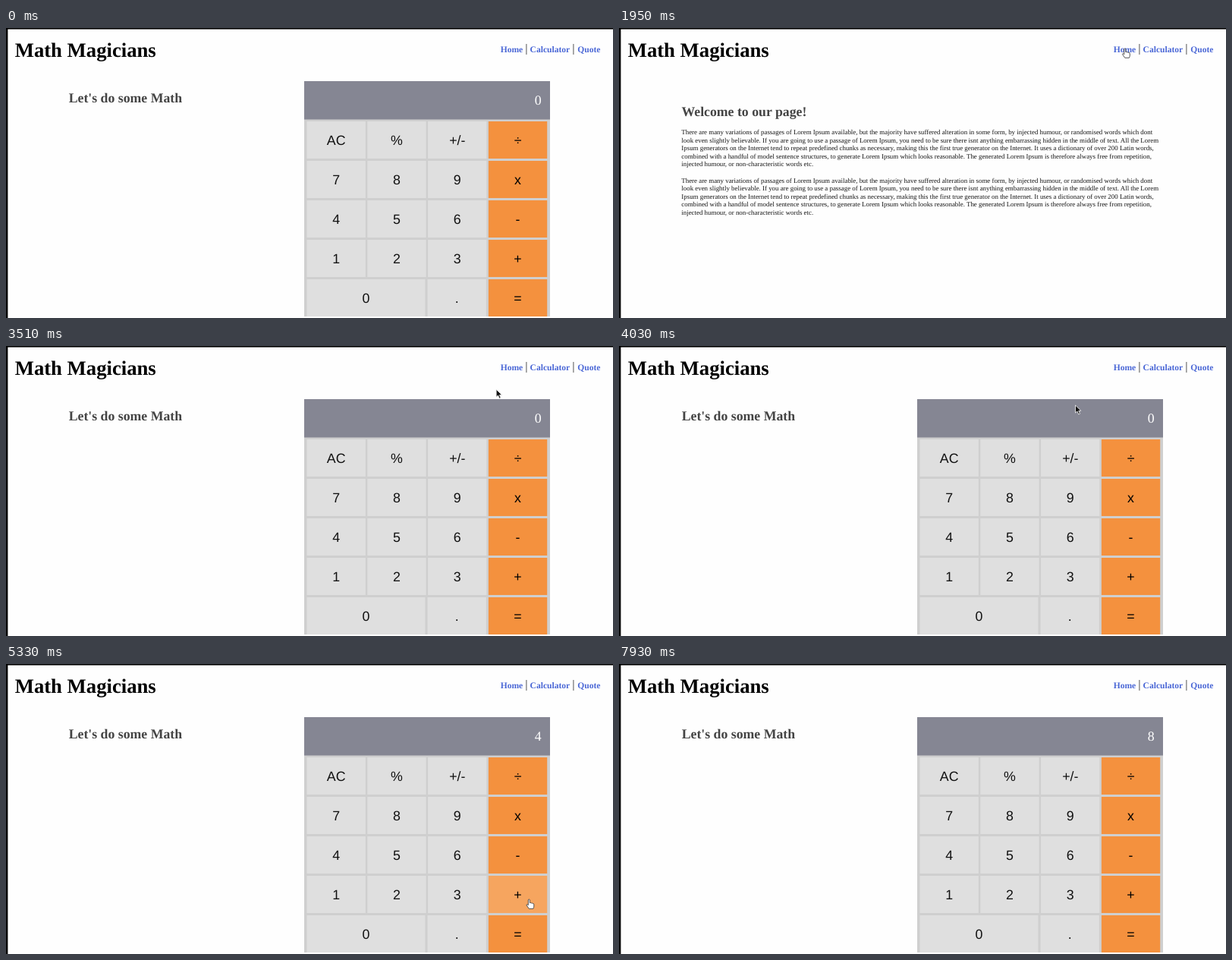
An HTML page for the animation above (9.1 s loop, 800 by 382 pixels).

```html
<!DOCTYPE html>
<html lang="en">
<head>
<meta charset="utf-8">
<title>Calculator demo</title>
<style>
  html, body { margin: 0; width: 100%; height: 100%; overflow: hidden; background: #fefefe; }
  svg { display: block; width: 800px; height: 382px; }
  text { font-family: "Liberation Serif", "Times New Roman", serif; white-space: pre; text-rendering: geometricPrecision; }
  .bold { font-weight: bold; }
  .nav { font-weight: bold; font-size: 11.55px; fill: #4a67d6; }
  .key { font-family: "Liberation Sans", Arial, sans-serif; font-size: 17.8px; text-anchor: middle; }
</style>
</head>
<body>
<svg id="stage" viewBox="0 0 800 382"></svg>
<script>
const LOOP = 9100, STEP = 130;
const stage = document.getElementById('stage');

function add(parent, tag, attrs, content) {
  const node = document.createElementNS('http://www.w3.org/2000/svg', tag);
  for (const name in attrs) node.setAttribute(name, attrs[name]);
  if (content !== undefined) node.textContent = content;
  parent.appendChild(node);
  return node;
}
const rect = (parent, x, y, width, height, fill) => add(parent, 'rect', { x, y, width, height, fill });
const text = (parent, x, y, content, attrs) => add(parent, 'text', { x, y, ...attrs }, content);
const show = (node, on) => node.setAttribute('visibility', on ? 'visible' : 'hidden');

// Header
rect(stage, 0, 0, 800, 382, '#fefefe');
rect(stage, 0, 0, 800, 1.6, '#000');
rect(stage, 0, 0, 2.4, 382, '#000');
text(stage, 11.7, 38, 'Math Magicians', { class: 'bold', 'font-size': 26.7, fill: '#000' });
[['Home', 651.7], ['Calculator', 690.6], ['Quote', 753.3]].forEach(([label, x]) => text(stage, x, 31.8, label, { class: 'nav' }));
[685.4, 747.4].forEach(x => rect(stage, x, 21, 1, 14, '#555'));

// Home page
const home = add(stage, 'g', {});
text(home, 82.5, 116, 'Welcome to our page!', { class: 'bold', 'font-size': 17.75, fill: '#444' });
const lorem = [
  'There are many variations of passages of Lorem Ipsum available, but the majority have suffered alteration in some form, by injected humour, or randomised words which dont',
  'look even slightly believable. If you are going to use a passage of Lorem Ipsum, you need to be sure there isnt anything embarrassing hidden in the middle of text. All the Lorem',
  'Ipsum generators on the Internet tend to repeat predefined chunks as necessary, making this the first true generator on the Internet. It uses a dictionary of over 200 Latin words,',
  'combined with a handful of model sentence structures, to generate Lorem Ipsum which looks reasonable. The generated Lorem Ipsum is therefore always free from repetition,',
  'injected humour, or non-characteristic words etc.'
];
[140, 203.6].forEach(top => lorem.forEach((line, i) =>
  text(home, 82.3, top + i * 10.55, line, { 'font-size': 8.9, fill: '#151515' })));

// Calculator page
const calculator = add(stage, 'g', {});
text(calculator, 82.7, 98, "Let's do some Math", { class: 'bold', 'font-size': 17.75, fill: '#444' });
rect(calculator, 393, 70, 324, 310, '#cfcfcf');
rect(calculator, 393, 70, 324, 50.5, '#858693');
const display = text(calculator, 705.6, 101.4, '0', { 'font-size': 17.8, fill: '#fff', 'text-anchor': 'end' });

const keys = [];
function addKey(label, x, y, width, orange) {
  const face = rect(calculator, x, y, width, 49, '');
  text(calculator, x + width / 2, y + 30.6, label, { class: 'key', fill: orange ? '#000' : '#111' });
  keys.push({ face, x, y, width, fill: orange ? '#f4913e' : '#dfdfdf', hover: orange ? '#f6a55f' : '#e7e7e7' });
}
const rows = [['AC', '%', '+/-', '÷'], ['7', '8', '9', 'x'], ['4', '5', '6', '-'], ['1', '2', '3', '+']];
rows.forEach((row, r) => row.forEach((label, c) => addKey(label, 396.5 + c * 79.8, 123 + r * 52, 77.3, c === 3)));
addKey('0', 396.5, 331, 156, false);
addKey('.', 555.5, 331, 77.3, false);
addKey('=', 635.9, 331, 77.3, true);

// Pointers, both with the hotspot at 0,0
const outline = { 'stroke-width': 0.9, 'stroke-linejoin': 'round' };
const arrow = add(stage, 'path', { d: 'M0 0V10L2.4 8L4.2 12L6 11.2L4.3 7.4H7.5Z', fill: '#111', stroke: '#eee', ...outline });
const hand = add(stage, 'path', {
  d: 'M-1.2 1Q-1.2 0 -.2 0T.8 1V4.6Q2 4 2.8 5Q4 4.5 4.7 5.5Q6.3 5.2 6.3 6.8V9Q6.3 10.5 5.4 12.3H-.3Q-1.8 10 -3.4 7.8Q-3.5 6.3 -2.2 6.8L-1.2 7.7Z',
  fill: '#fff', stroke: '#444', ...outline
});

// Pointer stops: time, x, y
const path = [
  [650, 560, 382], [1430, 667, 27], [1950, 667, 27], [2080, 667, 27], [2470, 708.5, 28], [2860, 708.5, 28],
  [4030, 601.5, 78], [4550, 446, 256], [5070, 446, 256], [5330, 689.5, 310], [5590, 689.5, 310],
  [5980, 446, 256], [6110, 446, 256], [6500, 673.5, 350], [7020, 673.5, 350], [7800, 735, 386]
];
const readings = [[0, '0'], [4680, '4'], [5460, '4+'], [6110, '4+4'], [6760, '8']];
const ease = u => u * u * (3 - 2 * u);

function pointerAt(t) {
  const i = path.findIndex(stop => stop[0] > t);
  if (i < 1) return null;
  const [t0, x0, y0] = path[i - 1], [t1, x1, y1] = path[i];
  const u = ease((t - t0) / (t1 - t0));
  return { x: x0 + (x1 - x0) * u, y: y0 + (y1 - y0) * u };
}

function render(now) {
  const t = Math.floor((now % LOOP) / STEP) * STEP;
  const atHome = t >= 1690 && t < 2600;
  show(home, atHome);
  show(calculator, !atHome);
  display.textContent = readings.filter(([start]) => start <= t).pop()[1];

  const p = pointerAt(t);
  let clickable = p && p.y > 20 && p.y < 36 && p.x > 651 && p.x < 784;
  for (const key of keys) {
    const over = p && !atHome && p.x >= key.x && p.x < key.x + key.width && p.y >= key.y && p.y < key.y + 49;
    key.face.setAttribute('fill', over ? key.hover : key.fill);
    clickable = clickable || over;
  }
  show(hand, p && clickable);
  show(arrow, p && !clickable);
  if (p) [hand, arrow].forEach(node => node.setAttribute('transform', `translate(${p.x} ${p.y})`));
}

const start = performance.now();
function tick() {
  render(performance.now() - start);
  requestAnimationFrame(tick);
}
tick();
</script>
</body>
</html>
```
